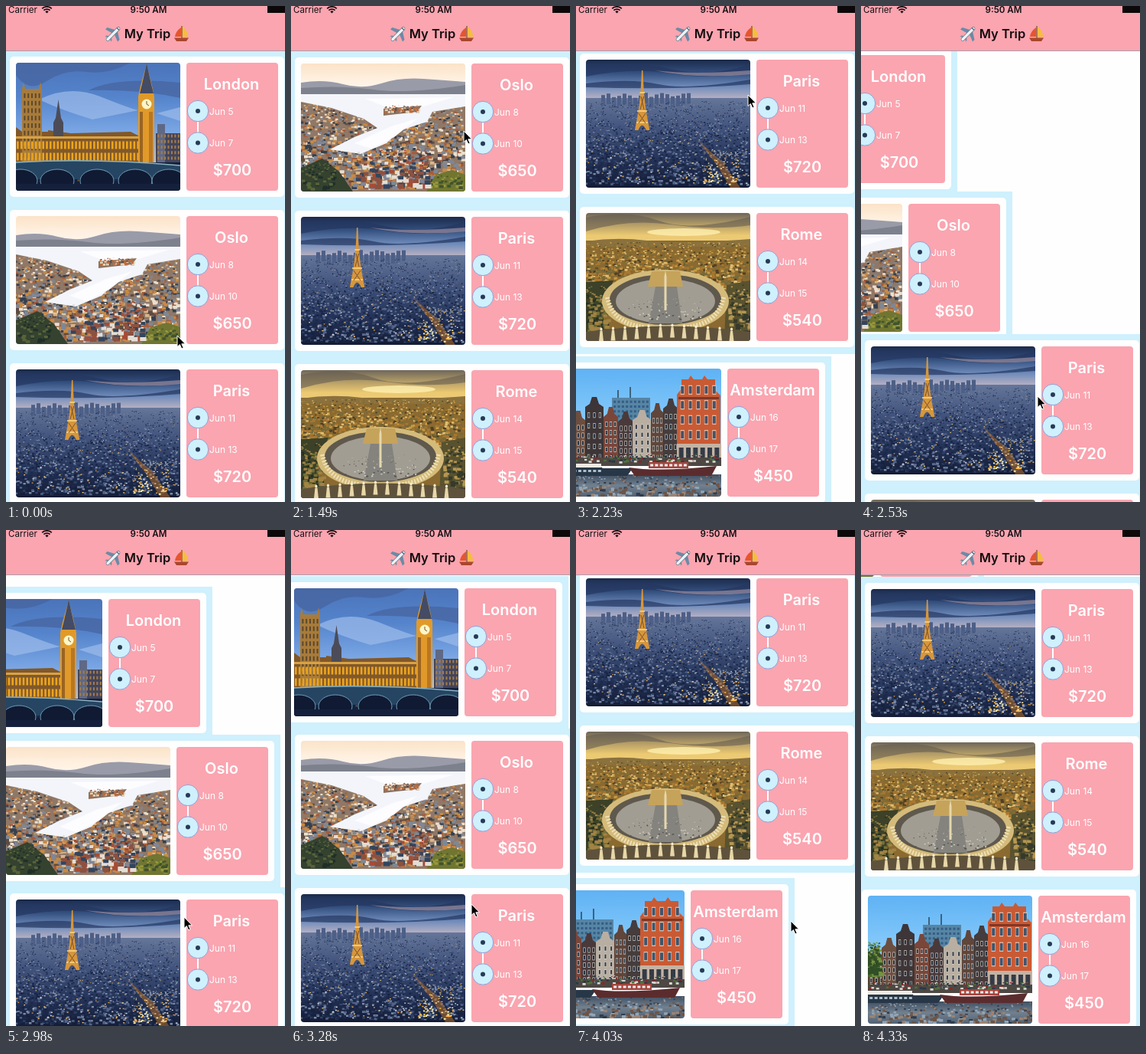
These frames come from a looping animation (365x647 px, 4430 ms). An HTML page:

```html
<!DOCTYPE html>
<html lang="en">
<head>
<meta charset="utf-8">
<title>My Trip</title>
<style>
html, body { margin: 0; width: 100%; height: 100%; overflow: hidden; }
#stage { position: relative; width: 365px; height: 100%; max-height: 647px; overflow: hidden; contain: strict; background: #fefefe; }
svg { position: absolute; left: 0; top: 0; font-family: Inter, "Liberation Sans", sans-serif; }
.card { left: -3px; will-change: transform; }
</style>
</head>
<body>
<div id="stage"></div>
<script>
const LOOP = 4430, SLIDE = 940;
const BLUE = '#cff0fd', PINK = '#faa5b0';

let seed = 11;
const rnd = () => (seed = seed * 16807 % 2147483647) / 2147483647;
const rect = (x, y, w, h, fill, rx = 0) =>
  `<rect x="${x}" y="${y}" width="${w}" height="${h}" rx="${rx}" fill="${fill}"/>`;
const path = (d, fill, more = '') => `<path d="${d}" fill="${fill}" ${more}/>`;
const line = (d, color, width = 1, more = '') => path(d, 'none', `stroke="${color}" stroke-width="${width}" ${more}`);
const oval = (x, y, rx, ry, fill, more = '') =>
  `<ellipse cx="${x}" cy="${y}" rx="${rx}" ry="${ry}" fill="${fill}" ${more}/>`;
const text = (x, y, size, weight, str, fill = '#fff', anchor = 'start') =>
  `<text x="${x}" y="${y}" font-size="${size}" font-weight="${weight}" fill="${fill}" text-anchor="${anchor}">${str}</text>`;

// Vertical gradient band
const band = (id, y, h, ...colors) =>
  `<linearGradient id="${id}" x2="0" y2="1">` +
  colors.map((c, i) => `<stop offset="${i / (colors.length - 1)}" stop-color="${c}"/>`).join('') +
  `</linearGradient>` + rect(0, y, 215, h, `url(#${id})`);

// Scattered blocks that grow toward the viewer
const town = (x, y, w, h, n, size, colors) => colors.map(c => {
  let d = '';
  for (let i = 0; i < n; i++) {
    const v = rnd(), s = size * (.4 + v);
    d += `M${(x + rnd() * w).toFixed(1)} ${(y + v * h).toFixed(1)}h${s.toFixed(1)}v${(s * .7).toFixed(1)}h${-s.toFixed(1)}z`;
  }
  return path(d, c);
}).join('');

// Regular grid of small panes
const grid = (x, y, w, h, nx, ny, fill, pw = 2, ph = 4) => {
  let d = '';
  for (let i = 0; i < nx; i++) for (let j = 0; j < ny; j++)
    d += `M${x + (i + .5) * w / nx - pw / 2} ${y + (j + .5) * h / ny - ph / 2}h${pw}v${ph}h${-pw}z`;
  return path(d, fill);
};

function london() {
  let s = band('ls', 0, 135, '#4a74ba', '#5584cc', '#7aa6e4', '#b4cdee');
  s += path('M0 0H150Q120 16 92 12T40 24 0 16zM95 36Q130 18 215 26V46Q160 34 95 36z', '#47659f', 'opacity=".75"');
  s += path('M30 48Q70 28 110 44T160 62L100 74Q60 62 30 48zM184 66l31-8v18z', '#9dbdec', 'opacity=".7"');
  s += rect(183, 92, 32, 42, '#43445a') + rect(185, 80, 10, 50, '#5f6885') + grid(184, 92, 31, 36, 7, 5, '#a57d48');
  s += path('M0 134V84l8 6H42V88L72 92 150 90l12 6v38z', '#80582a');
  s += path('M49 96V78l3-6 3.5-24 3.5 24 3 6v18z', '#4c4c58');
  s += path('M8 132V34l2-9 2 9h18l2-9 2 9v98z', '#a87b3a') + grid(9, 38, 24, 88, 5, 9, '#5c482d', 2, 6);
  s += path('M0 96h162v3H0z', '#d9a243') + grid(0, 100, 162, 30, 34, 2, '#eda51d', 2.6, 10);
  s += path('M160 132V44l3-14 8-28 7 28 3 14v88z', '#e19a29') + path('M162 40l3-12 6-27 6 27 3 12z', '#444b64');
  s += rect(162, 64, 4, 66, '#9a6320') + rect(174, 64, 5, 66, '#b97722') + oval(171, 54, 6.5, 6.5, '#fff6c8');
  s += line('M171 50v4l3 2', '#6b5733');
  s += rect(0, 130, 215, 37, '#131f3d') + town(0, 151, 212, 14, 22, 5, ['#1f3157', '#70502f', '#0b152e']);
  s += path('M0 130Q100 124 215 134V152H0z', '#254563');
  for (const x of [6, 54, 106, 156, 200]) s += oval(x, 154, 22, 15, '#101a33', 'stroke="#6f9bb0"');
  return s + rect(0, 158, 215, 9, '#15213c') + line('M0 130Q100 124 215 134', '#8bb4c4', 1.5);
}

function oslo() {
  let s = band('os', 0, 45, '#fbe3c8', '#fff1e2', '#fefaf6');
  s += path('M0 25Q30 20 55 27T105 26 160 20 215 24V42H0z', '#9a9ba8') + path('M0 32Q50 28 95 34T215 28V42H0z', '#7d818d');
  s += rect(0, 40, 215, 127, '#8f7867');
  s += town(-4, 46, 214, 114, 260, 5, ['#5e4c43', '#d8b58c', '#a55c3b', '#eadfce', '#35404f', '#c88a45', '#7f8795']);
  s += path('M0 40H215V56L172 63 165 76 128 88 112 104 78 118 38 112 70 96 100 84 82 72 40 58 0 50z', '#f3f5fa');
  s += path('M84 46L200 44 160 56 120 60zM70 104L118 82 152 72 122 96 92 111z', '#fdfdff');
  s += path('M108 59l50-4-6 8-44 5z', '#8c7260') + town(108, 54, 45, 8, 24, 3, ['#584a49', '#e5d2b5', '#bc6b3e']);
  s += path('M0 136L28 124 50 141 68 167H0z', '#34422f') + path('M164 167l12-22 22-6 17 6v22z', '#707631');
  s += town(0, 128, 45, 34, 36, 4, ['#1f2e28', '#59633a']) + town(165, 145, 45, 16, 24, 4, ['#98983c', '#40532d']);
  return s + town(70, 112, 95, 46, 36, 6, ['#a64c36', '#e3ddd5', '#33455e', '#8c5140']);
}

function paris() {
  let s = band('ps', 0, 52, '#1b2a4b', '#34507f', '#6d8aba', '#bdb4c4');
  s += path('M0 8Q60 0 110 12T215 6V18Q160 26 110 18T0 22zM0 31Q60 24 95 32T215 26V32Q120 40 0 36z', '#243760', 'opacity=".7"');
  s += path('M90 14Q140 20 215 14V19Q145 26 90 14z', '#ae9aa9', 'opacity=".6"');
  s += band('pt', 50, 117, '#65769a', '#42547d', '#25345a', '#141c35');
  for (let i = 0; i < 17; i++) s += rect(20 + i * 7, 43 + rnd() * 7, 5, 14, '#4d5f86');
  s += town(-3, 54, 214, 108, 420, 2.6, ['#152140', '#7c8aa6', '#2f4167', '#53648a', '#1b294a']);
  s += town(0, 58, 213, 104, 70, 1.5, ['#ffd078', '#d99c45', '#dce0e5']);
  s += path('M146 105l32 28 24 34h-13l-18-30z', '#a5672b', 'opacity=".6"') + town(150, 118, 50, 44, 50, 2, ['#ffba4a', '#fff0ac']);
  s += path('M73 14h1.4l1.4 28 2.6 24 5 26h-4.5q-5.500-13-10.500 0h-4.500l5-26 2.600-24z', '#d7963b');
  return s + line('M70.500 43h6.500M67 67h13M66 82h15', '#ffd982', 1.5) +
    line('M72 48l4 17M75.500 48l-4.500 17M69 70l9 13M78 70l-9 13', '#79502e');
}

function rome() {
  let s = band('rs', 0, 44, '#6f675a', '#b29b67', '#ecca72', '#edcb7e');
  s += path('M0 6Q55-5 95 10T215 5V16Q165 23 110 15T0 24z', '#675e50', 'opacity=".6"') + oval(128, 25, 48, 5, '#fff0b0', 'opacity=".8"');
  s += rect(0, 36, 215, 131, '#8a6a30');
  s += path('M0 37Q40 31 80 36T215 34V44H0z', '#8a713d');
  s += town(-3, 38, 214, 62, 240, 4, ['#c59b45', '#4f3f24', '#dfbd70', '#75693a', '#a9772f']);
  s += path('M0 90L36 88 20 130 34 167H0z', '#3c4128') + path('M184 94l31-6v79h-34z', '#59522f');
  s += town(0, 95, 28, 65, 50, 5, ['#252f22', '#747039', '#a28344']) + town(186, 92, 28, 70, 50, 5, ['#b49752', '#353a2a']);
  s += oval(104, 115, 83, 41, '#d4bb7b') + oval(104, 113, 73, 33, '#5f584c') + oval(104, 115, 65, 29, '#a19d93');
  s += path('M86 76h37l4 20H81z', '#c6a35a') + path('M91 96h28l7 48H82z', '#85837d');
  s += line('M28 110q7 34 48 39M180 110q-7 34-48 39', '#eee0b6', 6, 'stroke-dasharray="2 2"');
  s += town(55, 110, 95, 28, 40, 1.6, ['#56534d', '#d6d1c5']);
  s += path('M102.5 127V83l1.5-8 1.5 8v44z', '#e5d7ae');
  s += path('M0 155Q105 140 215 155V167H0z', '#5f523c');
  for (let i = 0; i < 12; i++) {
    const x = 18 + i * 15.5, y = 146 + Math.abs(i - 5.5);
    s += oval(x + 2, y, 1.6, 2, '#f8edcf') + path(`M${x + .5} ${y + 2}h3l1.500 14h-6z`, '#e8d7a8');
  }
  return s;
}

function amsterdam() {
  let s = band('as', 0, 125, '#5fb2f4', '#83c8fa', '#c1e5fb');
  s += rect(72, 38, 50, 70, '#5685a5') + grid(73, 40, 48, 25, 9, 4, '#355d82', 3, 3) + line('M80 38V28M96 38V24', '#3d627e', 2);
  const houses = [[0, 22, 66, '#54422f'], [18, 20, 54, '#6c4e40'], [37, 24, 36, '#3d3537'], [61, 19, 49, '#7a4639'],
    [80, 20, 55, '#49393b'], [99, 25, 53, '#b9aea2'], [123, 17, 44, '#60453b'], [139, 20, 38, '#453c3d']];
  for (const [x, w, y, c] of houses) {
    s += path(`M${x} 126V${y + 14}l${w * .25} -4 ${w * .12} -9h${w * .26}l${w * .12} 9 ${w * .25} 4V126z`, c);
    s += grid(x + 1, y + 18, w - 2, 104 - y, 3, 5, '#e0d8ca', 3, 7) + grid(x + 1, y + 18, w - 2, 104 - y, 3, 5, '#283543', 2, 5.5);
  }
  s += path('M157 126V34l6-8V14h9l3-5 4 5h11l3-5 4 5h10v14l7 7v91z', '#c95a34');
  s += path('M159 37h53v3h-53z', '#7e3828') + grid(159, 18, 52, 78, 5, 4, '#f3dfca', 5, 12) + grid(159, 18, 52, 78, 5, 4, '#42536a', 4, 10);
  s += rect(157, 98, 58, 28, '#c3b3a4') + grid(158, 100, 56, 24, 6, 1, '#343b46', 6, 18);
  s += town(-4, 60, 19, 42, 50, 5, ['#496d2e', '#759340', '#314f26']);
  s += rect(0, 116, 215, 11, '#4d4843') + town(0, 111, 210, 10, 40, 3, ['#8a2528', '#d6d6cf', '#25394b', '#50713c']);
  s += band('aw', 138, 29, '#3f5064', '#71808f', '#526375');
  s += town(0, 139, 212, 26, 70, 4, ['#2e3c4d', '#9d8472', '#92a5b6', '#6c5548']);
  s += path('M0 126h55l5 4h39l-7 10H0z', '#283747') + path('M0 124h58v5H0z', '#eceae2') + grid(1, 130, 58, 7, 9, 1, '#c2d5df', 4, 2.5);
  return s + path('M94 129q40 6 115-2l-7 13H102z', '#5b2c2e') + rect(120, 122, 52, 8, '#a5443d') + grid(121, 123, 50, 6, 8, 1, '#e9eef0', 4, 3);
}

// city, arrival, departure, price, picture, times at which the card slides in
const trips = [
  ['London', 'Jun 5', 'Jun 7', '$700', london, [2454]],
  ['Oslo', 'Jun 8', 'Jun 10', '$650', oslo, [2180, 4088]],
  ['Paris', 'Jun 11', 'Jun 13', '$720', paris, []],
  ['Rome', 'Jun 14', 'Jun 15', '$540', rome, [3116]],
  ['Amsterdam', 'Jun 16', 'Jun 17', '$450', amsterdam, [1528, 3466]]
];

const stop = (y, date) =>
  oval(251, y, 13.7, 13.7, BLUE, 'stroke="#939fd4"') + oval(251, y, 3, 3, '#263b55') + text(266, y + 4.5, 12, 400, date);

const card = ([city, from, to, price, photo]) =>
  `<svg class="card" width="375" height="200" viewBox="-3 0 375 200">` +
  rect(-3, 0, 375, 200, BLUE) + rect(5, 8, 359, 183, '#fefefe', 5) +
  `<g transform="translate(13 16)" clip-path="url(#round)">${photo()}</g>` +
  rect(236, 16, 120, 167, PINK, 4) + text(295, 51, 20, 600, city, '#fff', 'middle') +
  rect(250, 90, 2, 20, '#fff') + stop(79, from) + stop(120.5, to) +
  text(296, 163, 20, 600, price, '#fff', 'middle') + `</svg>`;

const plane =
  path('M142 37L130 30.500l2.500-2.500 13 4zM141 35l5 11.500 2.500-2.500-3-13zM135 41l-5.500-1 2-1.500 5 1zM136 41l1 5.500 1.500-2-1-5z', '#6b8ba6') +
  line('M133 43.500L147 29.500', '#5d7080', 4.6, 'stroke-linecap="round"') +
  line('M133 43.500L147 29.500', '#edf1f4', 3.4, 'stroke-linecap="round"') + line('M145 28.500l3 3', '#4b6175', 1.2);
const boat =
  path('M230.500 26q7 6 8 14h-8z', '#f6bd3d') + path('M229 28q-7 5-8 12h8z', '#e6552f') +
  line('M230 26v16', '#7b4c2d', 1.2) + path('M220 41.500h19l-3 4.500h-13z', '#a9472e');

const header = `<svg width="365" height="59">
  <clipPath id="round"><rect width="215" height="167" rx="4"/></clipPath>` +
  rect(0, 0, 365, 58, PINK) + rect(0, 58, 365, 1, '#aa9dab') +
  text(3, 8.6, 11.6, 400, 'Carrier', '#151015') + text(186.5, 8.6, 11.6, 600, '9:50 AM', '#151015', 'middle') +
  line('M47.200 3.400a9 9 0 0 1 12.600 0M49.400 5.700a6 6 0 0 1 8.200 0', '#151015', 1.7) +
  path('M51.4 7.4a3 3 0 0 1 4.2 0l-2.1 2.1z', '#151015') + rect(342, 0, 23, 9, '#0c080a') +
  plane + text(185, 42, 16.5, 600, 'My Trip', '#120c0e', 'middle') + boat + `</svg>`;

const pointer = `<svg id="pointer" width="14" height="20" overflow="visible">` +
  path('M0 0v14.5l3.4-3 2.4 5.5 2.4-1-2.4-5.2h4.7z', '#000', 'stroke="#fff"') + `</svg>`;

document.getElementById('stage').innerHTML = trips.map(card).join('') + header + pointer;
const cards = [...document.querySelectorAll('.card')];
const arrow = document.getElementById('pointer');

// time, scroll offset, pointer x and y
const poses = [
  [0, 0, 224, 430], [1490, 199, 226, 163], [1640, 452, 226, 115], [1790, 445, 225, 116],
  [1940, 414, 225, 116], [2080, 411, 225, 116], [2230, 404, 225, 116], [2380, 397, -30, 0],
  [2530, 30, 231, 509], [2680, -45, 231, 509], [2830, -25, 232, 509], [2980, -8, 233, 505],
  [3130, -2, 235, 496], [3280, -1, 236, 488], [3430, 200, 250, 300], [3580, 430, 272, 420],
  [3730, 436, 281, 510], [3880, 418, 281, 510], [4030, 411, 281, 510], [4180, 404, 281, 510],
  [4330, 397, -30, 0]
];

// Remaining part of a card's entrance: 1 at the start, 0 in place
function away(starts, t) {
  const start = starts.filter(s => s <= t).pop();
  if (start === undefined) return 0;
  return (1 + Math.cos(Math.PI * Math.min(1, (t - start) / SLIDE))) / 2;
}

function draw() {
  const now = performance.now() % LOOP;
  const [t, scroll, x, y] = poses.filter(p => p[0] <= now).pop();
  cards.forEach((el, i) => {
    const a = away(trips[i][5], t);
    const top = 58 + 200 * i - scroll + 20 * a;
    el.style.transform = `translate(${Math.round(-250 * a)}px, ${Math.round(top)}px)`;
    // Cards outside the view take no space
    el.style.display = top < 647 && top > -200 ? '' : 'none';
  });
  arrow.style.transform = `translate(${x}px, ${y}px)`;
  requestAnimationFrame(draw);
}
draw();
</script>
</body>
</html>
```
